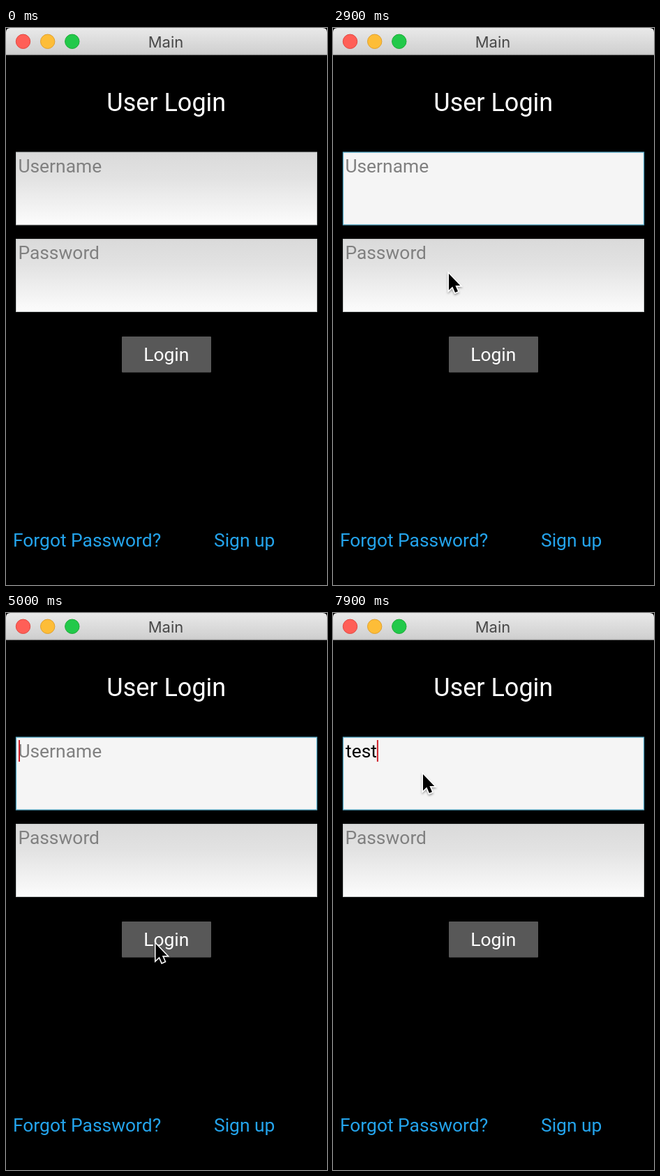
Recreate the animation shown at these times as an HTML page. Size 460 by 798 pixels, loop 8 s.

```html
<!DOCTYPE html>
<html lang="en">
<head>
<meta charset="utf-8">
<title>Login form</title>
<style>
  html, body { margin: 0; width: 100%; height: 100%; overflow: hidden; background: #000; }
  svg { display: block; width: 100%; height: 100%; }
  text { font: 26.4px Roboto, sans-serif; }
  .mid { text-anchor: middle; }
  .hint { fill: #808080; }
  .link { fill: #24a4ec; }
</style>
</head>
<body>
<svg viewBox="0 0 460 798">
  <defs>
    <linearGradient id="bar" x2="0" y2="1">
      <stop stop-color="#e9e9e9"/>
      <stop offset="1" stop-color="#cecece"/>
    </linearGradient>
    <linearGradient id="idle" x2="0" y2="1">
      <stop stop-color="#dadada"/>
      <stop offset=".35" stop-color="#e2e2e2"/>
      <stop offset="1" stop-color="#fcfcfc"/>
    </linearGradient>
    <filter id="soft" x="-50%" y="-50%" width="200%" height="200%">
      <feDropShadow dx="0" dy="2" stdDeviation="1.6" flood-opacity=".38"/>
    </filter>
  </defs>
  <rect width="460" height="798"/>

  <path d="M0 38.5V6Q0 0 6 0H454Q460 0 460 6V38.5Z" fill="url(#bar)"/>
  <rect y="37.5" width="460" height="1" fill="#b4b4b4"/>
  <g stroke-width="1">
    <circle cx="24.5" cy="19.3" r="10.2" fill="#ff5f57" stroke="#e2463f"/>
    <circle cx="59.7" cy="19.3" r="10.2" fill="#fdbd38" stroke="#e0a02d"/>
    <circle cx="94.8" cy="19.3" r="10.2" fill="#22c94a" stroke="#1bab35"/>
  </g>
  <text class="mid" x="229" y="28" fill="#484848" style="font:22px Inter, sans-serif">Main</text>

  <text class="mid" x="229.8" y="119" fill="#fff" style="font-size:36px">User Login</text>

  <rect id="user" x="14.5" y="178" width="431" height="104"/>
  <text id="entry" x="18" y="206.5"></text>
  <rect id="caret" y="182" width="2" height="31" fill="#d0202a"/>

  <rect x="14.5" y="302.5" width="431" height="104" fill="url(#idle)" stroke="#c4c8c8"/>
  <text class="hint" x="17.4" y="331">Password</text>

  <rect x="166" y="442" width="128" height="51.5" rx="1" fill="#585858"/>
  <text class="mid" x="229.8" y="477.3" fill="#fff">Login</text>

  <text class="link" x="10" y="743.3">Forgot Password?</text>
  <text class="link" x="298" y="743.3">Sign up</text>

  <path id="pointer" d="M0 0V23.5L5.3 18.5L9 27L13 25.3L9.4 17H16.3Z" fill="#000"
    stroke="#fff" stroke-width="3" paint-order="stroke" filter="url(#soft)"/>
</svg>
<script>
  const LOOP = 8000, STEP = 100;
  const FOCUS = 1000, ENTER = 300;
  const blinks = [1000, 1500, 2000, 2400, 3000, 3400, 3900, 4400, 4900, 5500, 5900, 6400, 6900];
  const keys = [7200, 7400, 7600, 7800];
  const word = "test";
  // Pointer stops: time, x, y
  const stops = [
    [200, 250, 420], [700, 120.5, 223], [2300, 120.5, 223], [2800, 166, 352],
    [3200, 166, 352], [3800, 214.5, 460], [4200, 214.5, 460], [4700, 214.5, 474],
    [5400, 214.5, 474], [6300, 129, 231]
  ];

  const $ = id => document.getElementById(id);
  const user = $("user"), entry = $("entry"), caret = $("caret"), pointer = $("pointer");
  const set = (el, attrs) => Object.entries(attrs).forEach(([k, v]) => el.setAttribute(k, v));
  const show = (el, on) => set(el, { visibility: on ? "visible" : "hidden" });
  const passed = (times, t) => times.filter(at => at <= t).length;
  const ease = u => u * u * (3 - 2 * u);

  function pointerAt(t) {
    const i = passed(stops.map(s => s[0]), t);
    if (i === 0) return stops[0].slice(1);
    if (i === stops.length) return stops[i - 1].slice(1);
    const [t0, x0, y0] = stops[i - 1], [t1, x1, y1] = stops[i];
    const u = ease((t - t0) / (t1 - t0));
    return [x0 + (x1 - x0) * u, y0 + (y1 - y0) * u];
  }

  function draw(time) {
    const t = Math.floor(time % LOOP / STEP) * STEP;
    const focused = t >= FOCUS, typed = passed(keys, t);

    set(user, focused
      ? { fill: "#f5f5f5", stroke: "#55a9c6", "stroke-width": 1.3 }
      : { fill: "url(#idle)", stroke: "#c4c8c8", "stroke-width": 1 });

    entry.textContent = typed ? word.slice(0, typed) : "Username";
    set(entry, { fill: typed ? "#000" : "#808080", x: typed ? 18 : 17.4 });

    set(caret, { x: typed ? 18 + entry.getComputedTextLength() : 18 });
    show(caret, typed > 0 || passed(blinks, t) % 2 === 1);

    show(pointer, t >= ENTER);
    set(pointer, { transform: `translate(${pointerAt(t)})` });
  }

  const start = performance.now();
  function tick() {
    draw(performance.now() - start);
    requestAnimationFrame(tick);
  }
  tick();
</script>
</body>
</html>
```
